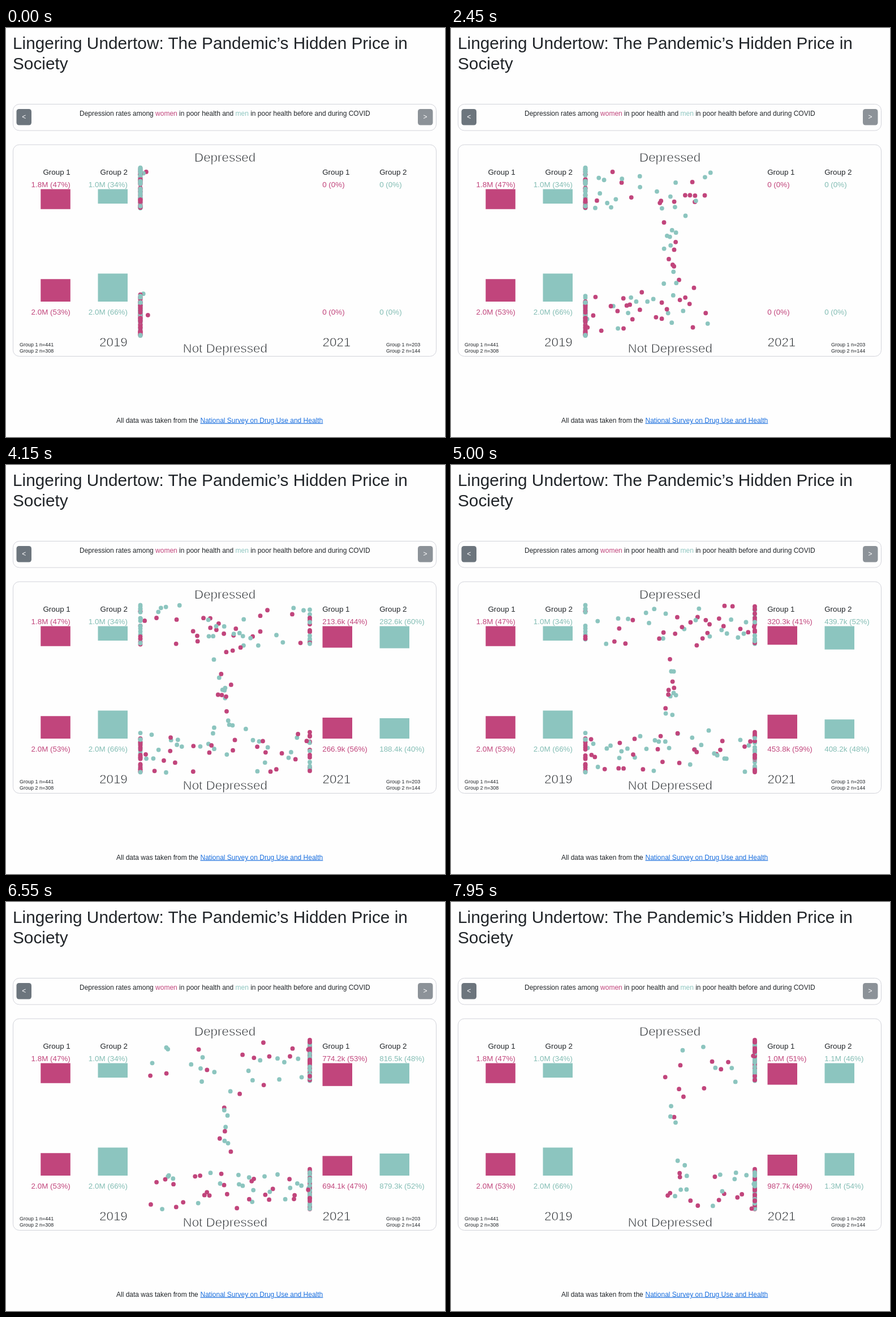
These frames come from a looping animation (776 px wide and 722 px high, 8000 ms). An HTML page with a canvas:

```html
<!DOCTYPE html>
<html lang="en">
<head>
<meta charset="utf-8">
<title>Depression rates</title>
<style>
  html, body { margin: 0; width: 100%; height: 100%; overflow: hidden; background: #fefefe; }
  svg, canvas { position: absolute; left: 0; top: 0; width: 776px; height: 722px; }
  text { font-family: "Liberation Sans", Arial, sans-serif; font-size: 12px; fill: #212529; }
  .title { font-size: 29.8px; }
  .thin { font-size: 22.4px; stroke: #fefefe; stroke-width: .75px; }
  .label, .value { font-size: 13.4px; }
  .small { font-size: 9px; }
  .sign { fill: #fff; text-anchor: middle; }
  .end { text-anchor: end; }
  .link { fill: #1a6fdf; text-decoration: underline; }
  .women { fill: #c1457c; }
  .men { fill: #8cc5bf; }
  .value.men { fill: #83bdb4; }
  .box { fill: none; stroke: #d2d3da; }
</style>
</head>
<body>
<svg viewBox="0 0 776 722">
  <text class="title" x="12" y="37">Lingering Undertow: The Pandemic’s Hidden Price in</text>
  <text class="title" x="12" y="73">Society</text>

  <rect class="box" x="12.5" y="134.5" width="748" height="46.5" rx="11"/>
  <rect x="18.5" y="143" width="26.5" height="28.5" rx="4.5" fill="#6c757d"/>
  <rect x="728" y="143" width="26.5" height="28.5" rx="4.5" fill="#8c9298"/>
  <text class="sign" x="31.8" y="161">&lt;</text>
  <text class="sign" x="741" y="161">&gt;</text>
  <text x="130" y="155">Depression rates among <tspan class="women">women</tspan> in poor health and <tspan class="men">men</tspan> in poor health before and during COVID</text>

  <rect class="box" x="12.5" y="206" width="748" height="373.5" rx="11"/>
  <text class="thin" x="333" y="236">Depressed</text>
  <text class="thin" x="312.5" y="573">Not Depressed</text>
  <text class="thin" x="165" y="562">2019</text>
  <text class="thin" x="559.5" y="562">2021</text>
  <text class="small" x="24" y="562">Group 1 n=441</text>
  <text class="small" x="24" y="573">Group 2 n=308</text>
  <text class="small" x="672" y="562">Group 1 n=203</text>
  <text class="small" x="672" y="573">Group 2 n=144</text>
  <g id="columns"></g>

  <text x="195" y="696.5">All data was taken from the</text>
  <text class="link" x="343.5" y="696.5">National Survey on Drug Use and Health</text>
</svg>
<canvas id="dots" width="776" height="722"></canvas>

<script>
const LOOP = 8000, TICK = 50, FLIGHT = 3400;
const LEFT = 237.5, RIGHT = 537;
const BEND = .93, SWAY = 9, CROSSING = .42;
const BAR_W = 52.5, BAR_TOP = 284.5, BAR_BASE = 483, BAR_SCALE = 75;
const BANDS = [[243.5, 318], [469, 543]];   // depressed, not depressed
const CLASSES = ['women', 'men'];
const COLORS = ['#c1457c', '#8cc5bf'];
const PEOPLE = [26695, 31403.7];            // people per dot

// Dots that have arrived by each of these times, by group and outcome.
const TIMES = [3270, 4150, 5000, 6550, 7950, 9820];
const ARRIVED = [
  [[0, 8, 12, 29, 38, 48], [0, 10, 17, 26, 37, 49]],
  [[0, 9, 14, 26, 35, 41], [0, 6, 13, 28, 41, 56]]
];
// Eased depressed share behind the bars on the right.
const SHARE_TIMES = [3600, 4150, 5000, 6550, 7950];
const SHARES = [[.54, .506, .437, .538, .507], [.48, .52, .549, .48, .47]];

let seed = 20;
function random() {
  seed = (seed * 1664525 + 1013904223) >>> 0;
  return seed / 4294967296;
}
const pick = ([lo, hi]) => lo + random() * (hi - lo);
const clamp = v => Math.max(0, Math.min(1, v));

// S-shaped link sampled by arc length, so each dot keeps a constant speed.
function makePath(y0, y1, sway, steps = 60) {
  const points = [];
  let length = 0;
  for (let i = 0; i <= steps; i++) {
    const t = i / steps, u = 1 - t;
    const along = 3 * t * u * (BEND * u + (1 - BEND) * t) + t * t * t;
    const x = LEFT + (RIGHT - LEFT) * along + sway * 4 * t * u;
    const y = y0 + (y1 - y0) * t * t * (3 - 2 * t);
    const last = points[i - 1];
    if (last) length += Math.hypot(x - last.x, y - last.y);
    points.push({ x, y, length });
  }
  return points;
}

function pointAt(path, p) {
  const goal = clamp(p) * path[path.length - 1].length;
  let i = 1;
  while (i < path.length - 1 && path[i].length < goal) i++;
  const a = path[i - 1], b = path[i];
  const k = (goal - a.length) / (b.length - a.length || 1);
  return [a.x + (b.x - a.x) * k, a.y + (b.y - a.y) * k];
}

function makeDots() {
  const dots = [];
  ARRIVED.forEach((outcomes, group) => outcomes.forEach((counts, outcome) => {
    for (let i = 1; i < counts.length; i++) {
      const n = counts[i] - counts[i - 1], span = TIMES[i] - TIMES[i - 1];
      for (let k = 0; k < n; k++) {
        const arrival = TIMES[i - 1] + (k + random()) / n * span;
        const origin = random() < CROSSING ? 1 - outcome : outcome;
        const path = makePath(pick(BANDS[origin]), pick(BANDS[outcome]), pick([-SWAY, SWAY]));
        dots.push({ group, outcome, arrival, path });
      }
    }
  }));
  return dots.sort((a, b) => a.arrival - b.arrival);
}

const columns = document.getElementById('columns');
function add(tag, attrs, content = '') {
  const node = document.createElementNS('http://www.w3.org/2000/svg', tag);
  for (const name in attrs) node.setAttribute(name, attrs[name]);
  node.textContent = content;
  columns.appendChild(node);
  return node;
}

function addColumn(group, x, textX, align) {
  const cls = CLASSES[group];
  add('text', { class: 'label ' + align, x: textX, y: 258.5 }, 'Group ' + (group + 1));
  return {
    group,
    bars: [0, 1].map(() => add('rect', { class: cls, x, width: BAR_W })),
    values: [280.7, 505.7].map(y => add('text', { class: `value ${cls} ${align}`, x: textX, y }))
  };
}

function setBars(column, heights) {
  heights.forEach((h, i) => {
    column.bars[i].setAttribute('y', i ? BAR_BASE - h : BAR_TOP);
    column.bars[i].setAttribute('height', h);
  });
}

function setValues(column, values) {
  values.forEach((v, i) => { column.values[i].textContent = v; });
}

function short(n) {
  if (n >= 999950) return (n / 1e6).toFixed(1) + 'M';
  return n ? (n / 1e3).toFixed(1) + 'k' : '0';
}

function shareAt(group, t) {
  const values = SHARES[group], last = values.length - 1;
  if (t <= SHARE_TIMES[0]) return values[0];
  let i = 1;
  while (i < last && SHARE_TIMES[i] < t) i++;
  const k = clamp((t - SHARE_TIMES[i - 1]) / (SHARE_TIMES[i] - SHARE_TIMES[i - 1]));
  return values[i - 1] + (values[i] - values[i - 1]) * k * k * (3 - 2 * k);
}

[['1.8M (47%)', '2.0M (53%)', .47], ['1.0M (34%)', '2.0M (66%)', .34]].forEach(([top, bottom, share], group) => {
  const x = 61.3 + group * 101.2;
  const column = addColumn(group, x, x + BAR_W, 'end');
  setBars(column, [share * BAR_SCALE, (1 - share) * BAR_SCALE]);
  setValues(column, [top, bottom]);
});
const after = [0, 1].map(group => addColumn(group, 559.5 + group * 101, 559.2 + group * 101, 'start'));

const dots = makeDots();
const ctx = document.getElementById('dots').getContext('2d');

function draw(t) {
  const counts = [[0, 0], [0, 0]];
  ctx.clearRect(0, 0, 776, 722);
  for (const dot of dots) {
    if (dot.arrival <= t) counts[dot.group][dot.outcome]++;
    const [x, y] = pointAt(dot.path, 1 - (dot.arrival - t) / FLIGHT);
    ctx.fillStyle = COLORS[dot.group];
    ctx.beginPath();
    ctx.arc(x, y, 3.9, 0, Math.PI * 2);
    ctx.fill();
  }
  after.forEach(column => {
    const group = column.group, count = counts[group], total = count[0] + count[1];
    setValues(column, count.map(n =>
      `${short(n * PEOPLE[group])} (${Math.round(100 * n / (total || 1))}%)`));
    const share = shareAt(group, t);
    const grown = total ? clamp((t - 3270) / 300) * BAR_SCALE : 0;
    setBars(column, [share * grown, (1 - share) * grown]);
  });
}

function frame() {
  draw(Math.floor(performance.now() % LOOP / TICK) * TICK);
  requestAnimationFrame(frame);
}
frame();
</script>
</body>
</html>
```
